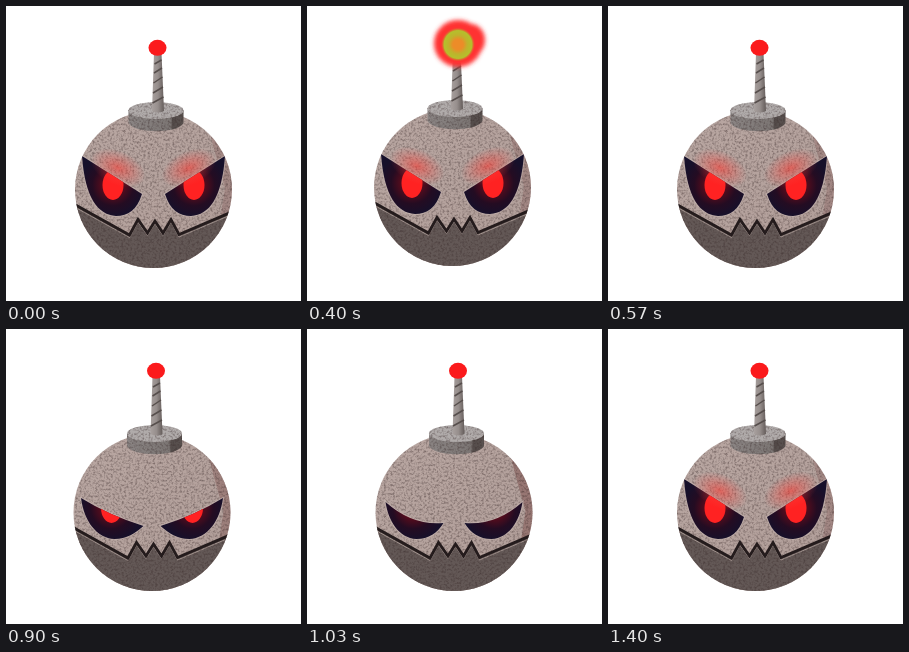
Animation of 295x295 px, one loop 1.56 s. Source, as an HTML page:

```html
<!DOCTYPE html>
<html lang="en">
<head>
<meta charset="utf-8">
<title>Bomb robot</title>
<style>
html, body { margin: 0; width: 100%; height: 100%; overflow: hidden; background: #fff; }
svg { display: block; width: 100%; height: 100%; }
</style>
</head>
<body>
<svg viewBox="0 0 295 295">
  <defs>
    <clipPath id="ball"><circle cx="147.500" cy="183.500" r="78.500"/></clipPath>
    <clipPath id="lids"><path id="lidShape"/></clipPath>
    <linearGradient id="skin" x1="0" y1="0" x2="1" y2="1">
      <stop offset="0" stop-color="#b9a7a2"/>
      <stop offset="1" stop-color="#b09d98"/>
    </linearGradient>
    <linearGradient id="side">
      <stop offset="0" stop-color="#8a8483"/>
      <stop offset=".77" stop-color="#7b7573"/>
      <stop offset=".8" stop-color="#554d4b"/>
      <stop offset="1" stop-color="#59514f"/>
    </linearGradient>
    <linearGradient id="rod">
      <stop offset="0" stop-color="#a8a09e"/>
      <stop offset=".5" stop-color="#968e8c"/>
      <stop offset="1" stop-color="#645c5a"/>
    </linearGradient>
    <radialGradient id="socket" gradientUnits="userSpaceOnUse" cx="107" cy="179" r="32">
      <stop offset=".3" stop-color="#5a0c1c"/>
      <stop offset=".65" stop-color="#240c22"/>
      <stop offset="1" stop-color="#16102a"/>
    </radialGradient>
    <radialGradient id="glow">
      <stop offset="0" stop-color="#ff3028" stop-opacity=".55"/>
      <stop offset=".5" stop-color="#f8443c" stop-opacity=".3"/>
      <stop offset="1" stop-color="#f04c48" stop-opacity="0"/>
    </radialGradient>
    <radialGradient id="core">
      <stop offset=".3" stop-color="#ec8c28"/>
      <stop offset=".55" stop-color="#bfb22c"/>
      <stop offset=".82" stop-color="#b4c02c"/>
      <stop offset="1" stop-color="#e0602c" stop-opacity="0"/>
    </radialGradient>
    <filter id="soft" x="-.3" y="-.3" width="1.6" height="1.6"><feGaussianBlur stdDeviation="2.200"/></filter>
    <filter id="paper" x="0" y="0" width="1" height="1" color-interpolation-filters="sRGB">
      <feTurbulence id="grain" type="fractalNoise" baseFrequency=".45" numOctaves="2"/>
      <feColorMatrix values="0 0 0 0 .2  0 0 0 0 .14  0 0 0 0 .14  1 0 0 0 -.43"/>
      <feComposite in2="SourceGraphic" operator="in"/>
      <feMerge><feMergeNode in="SourceGraphic"/><feMergeNode/></feMerge>
    </filter>
  </defs>
  <g id="bomb">
    <g filter="url(#paper)">
      <circle cx="147.500" cy="183.500" r="78.500" fill="url(#skin)"/>
      <g clip-path="url(#ball)">
        <path id="shade" d="M202 120L210 150L219 182L214 215L230 208V120Z" fill="#7c4e4c"/>
        <path id="jaw" fill="#635856"/>
        <g fill="none">
          <path id="rim" stroke="#a3948f" stroke-width="1" transform="translate(0 2.500)"/>
          <path id="gap" stroke="#231b1c" stroke-width="2.800"/>
        </g>
      </g>
      <path d="M122.500 104V117C128 128 172 128 177.500 117V104Z" fill="url(#side)"/>
      <ellipse cx="150" cy="104.500" rx="27.500" ry="8.500" fill="#b0abaa"/>
    </g>
    <g id="eyes" clip-path="url(#ball)"></g>
    <path d="M148 47H155.500L158 105Q152 108 146 105Z" fill="url(#rod)"/>
    <path d="M148.500 58l7-4M148 67l8-5M147.500 77l9-6M147 87l10-6M146.500 97l11-6" stroke="#564e4c" stroke-width="1.500"/>
    <ellipse cx="151.500" cy="41.800" rx="9" ry="8" fill="#fb1a1c"/>
  </g>
  <g id="flash">
    <g fill="#ff3030" filter="url(#soft)">
      <ellipse cx="151" cy="37.500" rx="24" ry="23.500"/>
      <ellipse cx="164" cy="34" rx="14" ry="16"/>
    </g>
    <circle cx="151" cy="38.500" r="17" fill="url(#core)"/>
  </g>
</svg>
<script>
const $ = id => document.getElementById(id);
const set = (el, attrs) => Object.entries(attrs).forEach(([k, v]) => el.setAttribute(k, v));

const bite = "M66 197L123.500 229L132 213.500L141.500 227L149 215L157 227L165 213.500L173 228.500L228 205";
set($("jaw"), { d: bite + "V270H66Z" });
set($("gap"), { d: bite });
set($("rim"), { d: bite });

// The lid runs from the outer corner to the inner one; the lower rim is shared.
const socket = (x, y, lid, inner) =>
  `M${x} ${y}Q${lid} ${inner}C131 204 122 210 110 210C92 209 ${x + 3} 192 ${x} ${y}Z`;

const eyes = (d, lit) => {
  const half = `<path d="${d}" fill="url(#socket)" stroke="#c9b8b3" stroke-opacity=".6" paint-order="stroke" stroke-width="2"/>`
    + `<ellipse cx="107" cy="179" rx="10.500" ry="15" fill="#ff2222" clip-path="url(#lids)" opacity="${lit}"/>`;
  return `<g>${half}</g><g transform="translate(295 0) scale(-1 1)">${half}</g>`;
};

const glows = [[112, 162, 24], [183, 162, -24]].map(([x, y, turn]) =>
  `<ellipse cx="${x}" cy="${y}" rx="29" ry="17" fill="url(#glow)" transform="rotate(${turn} ${x} ${y})"/>`).join("");

const wide = socket(76, 150, "106 169", "136 188");
const narrow = socket(76.5, 169, "104 186", "139 197");
const shut = socket(79, 173, "106 197", "137 194");

const poses = {
  idle: { x: 0, y: 0, eye: wide, lit: 1, glow: 1, dim: .3, seed: 3 },
  blast: { x: -2, y: -2, eye: wide, lit: 1, glow: 1, dim: .3, seed: 8, flash: 1 },
  squint: { x: -1.5, y: 0, eye: narrow, lit: 1, dim: .4, seed: 5 },
  shut: { x: -.5, y: 0, eye: shut, lit: 0, dim: .5, seed: 11 }
};
const steps = [[400, "idle"], [570, "blast"], [900, "idle"], [1030, "squint"], [1160, "shut"], [1560, "idle"]];
let shown;

function draw(ms) {
  const name = steps.find(([end]) => ms < end)[1];
  if (name === shown) return;
  shown = name;
  const p = poses[name];
  set($("bomb"), { transform: `translate(${p.x} ${p.y})` });
  set($("shade"), { opacity: p.dim });
  set($("grain"), { seed: p.seed });
  set($("lidShape"), { d: p.eye });
  set($("flash"), { opacity: p.flash || 0 });
  $("eyes").innerHTML = eyes(p.eye, p.lit) + (p.glow ? glows : "");
}

const start = performance.now();
function tick() {
  draw((performance.now() - start) % 1560);
  requestAnimationFrame(tick);
}
tick();
</script>
</body>
</html>
```
